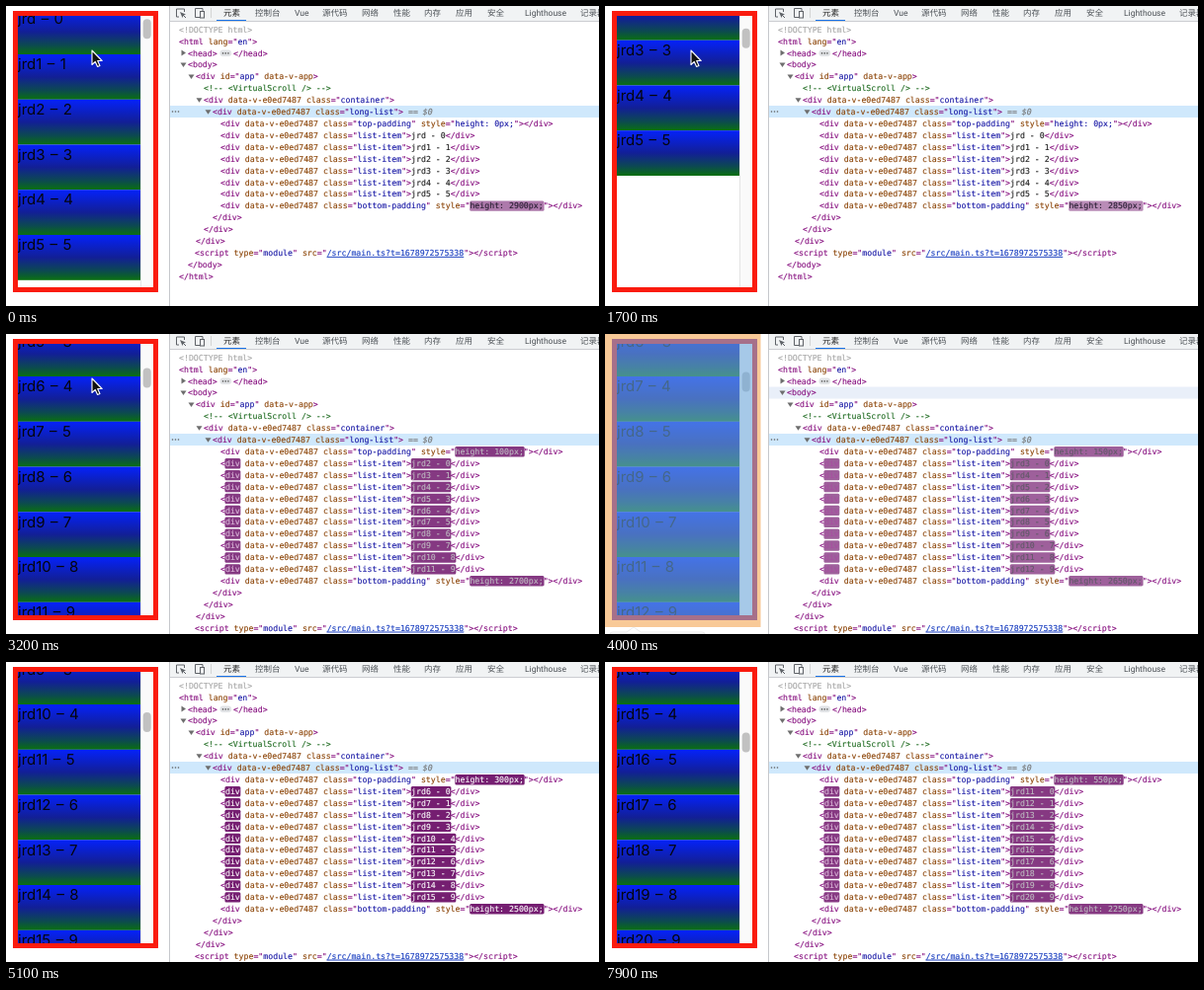
An HTML page that plays this animation: 600 by 304 pixels, repeating every 8 s.

```html
<!DOCTYPE html>
<html lang="en">
<head>
<meta charset="utf-8">
<style>
  html, body { margin: 0; width: 100%; height: 100%; overflow: hidden; background: #fff; }
  svg { display: block; width: 100vw; height: 100vh; text-rendering: geometricPrecision; }
  text { white-space: pre; }
  .code { font: 8.23px "DejaVu Sans Mono", "Liberation Mono", monospace; }
  .code tspan { color: #222; fill: currentColor; stroke: currentColor; stroke-width: .14px; }
  .code .tag { color: #881280; }
  .code .name { color: #8c4508; }
  .code .value { color: #1a1aa6; }
  .code .comment { color: #236e25; }
  .code .doctype { color: #a8a8a8; }
  .code .link { color: #1a3fc0; text-decoration: underline; }
  .code .dim { color: #777; font-style: italic; }
  .code .hotText { color: var(--hot-text); }
  .code .hotTag { color: var(--hot-tag); }
  .flash { fill: var(--flash); }
  .tab { font: 8.5px Roboto, "Noto Sans CJK SC", "Noto Sans CJK", sans-serif; fill: #4c5156; }
  .item { font: 15px Inter, "Liberation Sans", sans-serif; word-spacing: 1.2px; fill: #05050c; }
</style>
</head>
<body>
<svg id="stage" viewBox="0 0 600 304">
  <defs>
    <linearGradient id="shade" x1="0" y1="0" x2="0" y2="1">
      <stop offset="0" stop-color="#0522fa"/>
      <stop offset=".5" stop-color="#121f96"/>
      <stop offset=".8" stop-color="#0c4a50"/>
      <stop offset="1" stop-color="#0a7010"/>
    </linearGradient>
    <clipPath id="viewport"><rect x="12" y="10" width="124" height="275"/></clipPath>
  </defs>
  <rect width="600" height="304" fill="#fff"/>

  <g clip-path="url(#viewport)"><g id="list"></g></g>
  <rect x="136" y="10" width="13" height="275" fill="#fafafa"/>
  <path d="M136.5 10V285" stroke="#e4e4e4"/>
  <rect id="thumb" x="138.7" width="8" height="20" rx="4" fill="#c1c1c1"/>
  <rect x="9.5" y="7.5" width="142" height="280" fill="none" stroke="#fa1b0e" stroke-width="5"/>

  <g id="overlay">
    <path id="margin" d="M0 0H157.500V297H0ZM7 5V290H154V5Z" fill="#f6b26b" fill-opacity=".7" fill-rule="evenodd"/>
    <rect x="7" y="5" width="147" height="285" fill="#6fa8dc" fill-opacity=".6"/>
    <path d="M5 304Q5 302 8 302H22L29 297L36 302H98Q101 302 101 304Z" fill="#fff" stroke="#ddd" stroke-width=".6"/>
  </g>

  <rect x="165" width="435" height="304" fill="#fff"/>
  <rect id="hoverRow" x="166" width="434" height="12" fill="#e9eff9"/>
  <rect x="166" y="101" width="434" height="12" fill="#cfe8fc"/>
  <g id="tree"></g>
  <rect x="165" width="435" height="15" fill="#f1f3f4"/>
  <path d="M165 15.500H600" stroke="#cbcdd1"/>
  <path d="M165.500 0V304" stroke="#c6c8cc"/>
  <path d="M207.500 2V12" stroke="#ccc" stroke-width=".8"/>
  <path d="M213 14.500H243" stroke="#1a73e8"/>
  <g fill="none" stroke="#5f6368">
    <path d="M175 11H172.500V3H180.500V6"/>
    <path d="M176 6L182 8.500L179.500 9.500L178.500 12Z" fill="#5f6368" stroke="none"/>
    <path d="M179 9L182 12M196 11.500H191.500V2.500H199V5"/>
    <rect x="196.500" y="5.500" width="4" height="6.500"/>
  </g>
  <g id="tabs"></g>

  <path id="cursor" d="M0 0V14.500L3.300 11.400L5.600 16.500L8 15.400L5.700 10.500H10.200Z"
    fill="#111" stroke="#fff" stroke-width="1.100" stroke-linejoin="round"/>
</svg>
<script>
const LOOP = 8000;
const ITEM = 45.75;
const ROW = 11.91;
const CHAR = 4.955;
// The list only refreshes on a throttled tick.
const TICK = 522;
const FIRST_TICK = 912;
const AUTO_START = FIRST_TICK + 2 * TICK;
const BODY_HOVER = 3500, APP_HOVER = 4400, HOVER_END = 4700;
const $ = id => document.getElementById(id);
const escape = s => s.replace(/&/g, "&amp;").replace(/</g, "&lt;");
const clamp = v => Math.max(0, Math.min(1, v));
const mix = (a, b, k) => `rgb(${a.map((v, i) => Math.round(v + (b[i] - v) * k))})`;
const rowY = i => 23.8 + i * ROW;

const tabs = [[220, "元素"], [252, "控制台"], [292, "Vue"], [320, "源代码"], [360, "网络"], [392, "性能"],
  [423, "内存"], [455, "应用"], [487, "安全"], [525, "Lighthouse"], [581, "记录器"]];
$("tabs").innerHTML = tabs.map(([x, label], i) =>
  `<text class="tab" x="${x}" y="10"${i ? "" : ' style="fill:#222"'}>${label}</text>`).join("");

// A segment is [class, text]; classes starting with "hot" get a flash behind them.
const attr = (name, ...value) => [["name", " " + name], ["tag", '="'], ...value, ["tag", '"']];
const open = (name, ...attrs) => [["tag", "<" + name], ...attrs.flat(), ["tag", ">"]];
const close = name => [["tag", `</${name}>`]];
const scoped = (cls, ...more) => [[["name", " data-v-e0ed7487"]], attr("class", ["value", cls]), ...more];
const padding = (cls, height, hot) => [
  ...open("div", ...scoped(cls, attr("style", [hot ? "hotText" : "value", `height: ${height}px;`]))),
  ...close("div")];

function listItem(label, hot) {
  const [, ...rest] = open("div", ...scoped("list-item"));
  return [["tag", "<"], [hot ? "hotTag" : "tag", "div"], ...rest,
    [hot ? "hotText" : "text", label], ...close("div")];
}

function line(x, y, segments) {
  let column = 0, boxes = "", spans = "";
  for (const [cls, text] of segments) {
    if (cls.startsWith("hot")) {
      boxes += `<rect class="flash" x="${x + column * CHAR - .5}" y="${y - 5}"
        width="${text.length * CHAR + 1}" height="10.400" rx="1.500"/>`;
    }
    spans += `<tspan class="${cls}">${escape(text)}</tspan>`;
    column += text.length;
  }
  return `${boxes}<text class="code" x="${x}" y="${y + 2.9}">${spans}</text>`;
}

const arrow = (x, y, opened) =>
  `<path d="${opened ? "M-3 -2H3L0 2.500Z" : "M-2 -3V3L2.500 0Z"}" transform="translate(${x} ${y})" fill="#6e6e6e"/>`;

const dots = (xs, y) => xs.map(x => `<circle cx="${x}" cy="${y}" r=".8" fill="#5c5c5c"/>`).join("");

const label = (n, i) => `jrd${n || ""} - ${i}`;

function drawTree({ start, count, bottom, auto }) {
  const items = Array.from({ length: count }, (_, i) => [217, listItem(label(start + i, i), auto)]);
  const rows = [
    [175, [["doctype", "<!DOCTYPE html>"]]],
    [175, open("html", attr("lang", ["value", "en"]))],
    [184, open("head"), false],
    [184, open("body"), true],
    [192, open("div", attr("id", ["value", "app"]), [["name", " data-v-app"]]), true],
    [200, [["comment", "<!-- <VirtualScroll /> -->"]]],
    [200, open("div", ...scoped("container")), true],
    [209, [...open("div", ...scoped("long-list")), ["dim", " == $0"]], true],
    [217, padding("top-padding", start * 50, start > 0)],
    ...items,
    [217, padding("bottom-padding", bottom, true)],
    [209, close("div")], [200, close("div")], [192, close("div")],
    [191, [...open("script", attr("type", ["value", "module"]),
      attr("src", ["link", "/src/main.ts?t=1678972575338"])), ...close("script")]],
    [184, close("body")], [175, close("html")]
  ];
  const headY = rowY(2);
  $("tree").innerHTML = rows.map(([x, segments, opened], i) =>
    line(x, rowY(i), segments) + (opened === undefined ? "" : arrow(x - 4.5, rowY(i), opened))).join("")
    + `<rect x="216.500" y="${headY - 3}" width="11.500" height="6.500" rx="3" fill="#e1e3e6"/>`
    + dots([219.5, 222.2, 224.9], headY + .3)
    + line(230, headY, close("head"))
    + dots([168.5, 171.5, 174.5], 107);
}

function drawList({ start, count }) {
  $("list").innerHTML = Array.from({ length: count }, (_, i) => {
    const top = (start + i) * ITEM;
    return `<rect x="12" y="${top}" width="124" height="${ITEM + .1}" fill="url(#shade)"/>
      <text class="item" x="12" y="${top + 15.3}">${label(start + i, i).replace("-", "–")}</text>`;
  }).join("");
}

function stateAt(t) {
  if (t < AUTO_START) {
    const refreshed = t >= FIRST_TICK;
    return {
      start: 0, count: 6, bottom: refreshed ? 2850 : 2900, auto: false,
      scroll: 6.8 + 105.7 * (t / 1700) ** 1.6,
      age: refreshed ? t - FIRST_TICK : t - FIRST_TICK + 3 * TICK
    };
  }
  const start = Math.floor((t - AUTO_START) / TICK);
  return {
    start, count: 10, bottom: 2800 - start * 50, auto: true,
    scroll: 150 + start * ITEM,
    age: (t - AUTO_START) % TICK
  };
}

const show = (id, visible) => { $(id).style.display = visible ? "" : "none"; };

let drawn = "";
function render(t) {
  const state = stateAt(t);
  const key = [state.start, state.count, state.bottom].join();
  if (key !== drawn) {
    drawTree(state);
    drawList(state);
    drawn = key;
  }
  $("list").setAttribute("transform", `translate(0 ${10 - state.scroll})`);
  $("thumb").setAttribute("y", 12.7 + state.scroll * .09);

  const textFade = clamp(state.age / 650);
  const style = $("stage").style;
  style.setProperty("--flash", mix([116, 28, 112], [255, 255, 255], clamp(state.age / 1600)));
  style.setProperty("--hot-text", mix([255, 255, 255], [40, 30, 50], textFade));
  style.setProperty("--hot-tag", mix([255, 255, 255], [136, 18, 128], textFade));

  const hovering = t >= BODY_HOVER && t < HOVER_END;
  const onBody = t < APP_HOVER;
  show("overlay", hovering);
  show("hoverRow", hovering);
  show("margin", onBody);
  $("hoverRow").setAttribute("y", rowY(onBody ? 3 : 4) - 6);

  const move = clamp((t - 3300) / (BODY_HOVER - 3300)) ** 2;
  show("cursor", t < BODY_HOVER);
  $("cursor").setAttribute("transform", `translate(${87 + 105 * move} ${45 + 13 * move})`);
}

const began = performance.now();
function tick() {
  render((performance.now() - began) % LOOP);
  requestAnimationFrame(tick);
}
tick();
</script>
</body>
</html>
```
